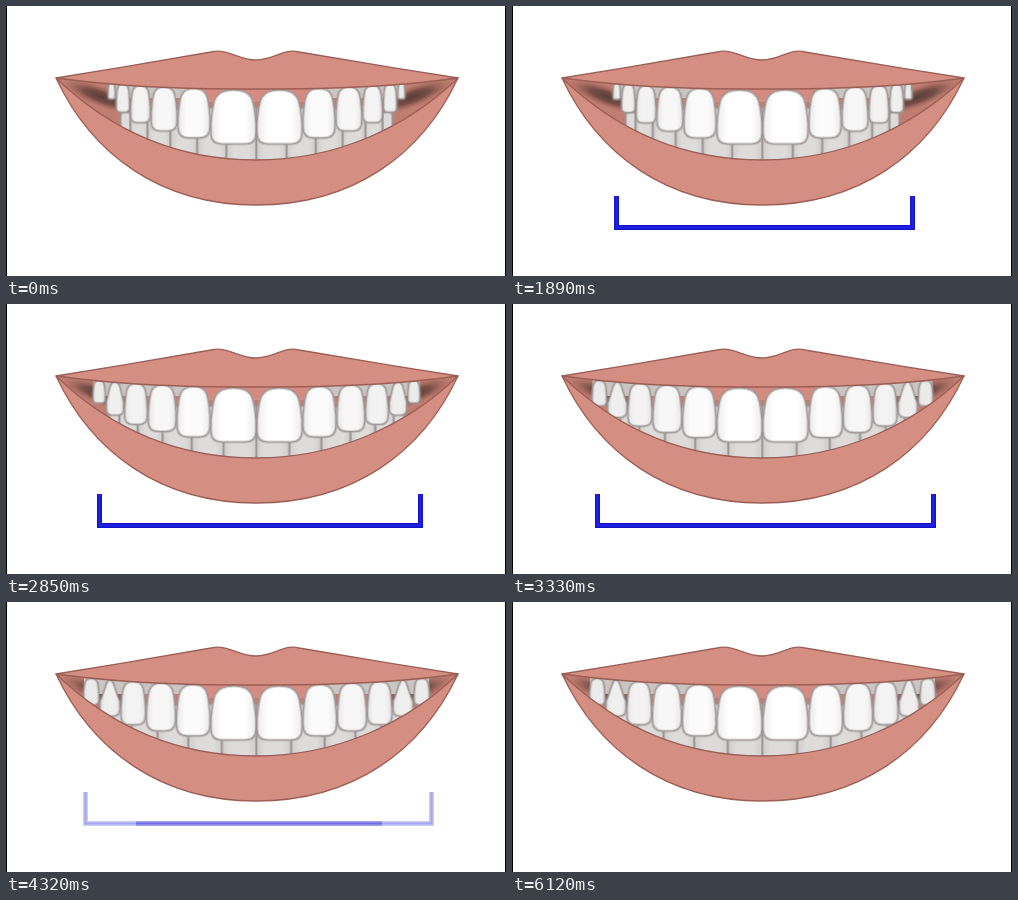
Animation of 500 by 270 pixels, one loop 6.33 s. Source, as an HTML page with a canvas:

```html
<!DOCTYPE html>
<html lang="en">
<head>
<meta charset="utf-8">
<title>Widening smile</title>
<style>
html, body { margin: 0; width: 100%; height: 100%; overflow: hidden; background: #fff; }
canvas { display: block; width: 500px; height: 270px; }
</style>
</head>
<body>
<canvas id="stage" width="500" height="270"></canvas>
<script>
const ctx = document.getElementById('stage').getContext('2d');
const LOOP = 6330, STEP = 30;
const MOVE_START = 1740, MOVE_END = 3630;
const PER_SIDE = 6, MIDDLE = 250.5;

const mouth = new Path2D('M50 72C110 80 160 83 250 83C340 83 395 80 452 72' +
  'C400 122 330 154 250 154C170 154 105 125 50 72Z');
const lips = new Path2D('M50 72C100 64 160 54 205 46C222 42 232 54 250 54' +
  'C268 54 278 42 293 46C340 54 400 64 452 72' +
  'C416 149 347 199 250 199C155 199 86 149 50 72Z');

const mix = (a, b, k) => a + (b - a) * k;
const clamp = v => Math.max(0, Math.min(1, v));
const smooth = u => u * u * (3 - 2 * u);

// Distances from the middle line to each tooth edge, given a width rule.
function edges(width) {
  const list = [0];
  for (let i = 0; i < PER_SIDE; i++) list.push(list[i] + width(i));
  return list;
}

function sideShade(x0, x1, edge, mid) {
  const g = ctx.createLinearGradient(x0, 0, x1, 0);
  g.addColorStop(0, edge);
  g.addColorStop(.25, mid);
  g.addColorStop(.75, mid);
  g.addColorStop(1, edge);
  return g;
}

// Fill, then a soft grey rim.
function paint() {
  ctx.fill();
  ctx.strokeStyle = 'rgba(160,154,154,.4)';
  ctx.lineWidth = 3;
  ctx.stroke();
  ctx.strokeStyle = 'rgba(150,143,143,.75)';
  ctx.lineWidth = 1.1;
  ctx.stroke();
}

function tooth(x0, x1, top, bottom, taper) {
  const w = x1 - x0, h = bottom - top, d = w * taper, r = Math.min(11, w * .36);
  ctx.beginPath();
  ctx.moveTo(x0 + w / 2, top);
  ctx.bezierCurveTo(x0 + d, top, x0 + d, top + h * .2, x0, top + h * .6);
  ctx.lineTo(x0, bottom - r);
  ctx.quadraticCurveTo(x0, bottom, x0 + r, bottom);
  ctx.lineTo(x1 - r, bottom);
  ctx.quadraticCurveTo(x1, bottom, x1, bottom - r);
  ctx.lineTo(x1, top + h * .6);
  ctx.bezierCurveTo(x1 - d, top + h * .2, x1 - d, top, x0 + w / 2, top);
  paint();
}

function lowerTeeth(k) {
  const xs = edges(i => mix(30, 34.5, k) - mix(.8, .95, k) * i * i);
  for (let i = PER_SIDE - 1; i >= 0; i--) {
    for (const side of [-1, 1]) {
      const x0 = MIDDLE + side * xs[i], x1 = MIDDLE + side * xs[i + 1];
      ctx.fillStyle = sideShade(x0, x1, '#cfcdcc', '#dddcdb');
      ctx.beginPath();
      ctx.roundRect(Math.min(x0, x1), 101 + i, Math.abs(x1 - x0), 60, 4);
      paint();
    }
  }
}

function upperTeeth(k) {
  const xs = edges(i => i ? mix(33, 34.5, k) - mix(6.2, 4.5, k) * (i - 1) : 46);
  const reach = xs[PER_SIDE] - 1;
  ctx.fillStyle = '#cbc5c3';
  ctx.fillRect(MIDDLE - reach, 76, reach * 2, 16);
  ctx.fillStyle = '#d58b80';
  ctx.fillRect(MIDDLE - 62, 80, 124, 16);
  for (let i = PER_SIDE - 1; i >= 0; i--) {
    const bottom = 138 - mix(6, 4, k) * i - .12 * i ** 3;
    const taper = i === 4 ? mix(.05, .3, k) : .05;
    const light = 255 - 4 * i, dim = 236 - 3 * i;
    for (const side of [-1, 1]) {
      const a = MIDDLE + side * (xs[i] + .5), b = MIDDLE + side * (xs[i + 1] - .5);
      const x0 = Math.min(a, b), x1 = Math.max(a, b);
      ctx.fillStyle = sideShade(x0, x1, `rgb(${dim},${dim},${dim})`, `rgb(${light},${light},${light})`);
      tooth(x0, x1, 84 - 1.5 * i, bottom, taper);
    }
  }
}

function corner(side) {
  ctx.save();
  ctx.translate(251 + side * 155, 91);
  ctx.rotate(-side * .36);
  ctx.scale(1, .25);
  const g = ctx.createRadialGradient(0, 0, 0, 0, 0, 42);
  g.addColorStop(0, 'rgba(82,58,52,.95)');
  g.addColorStop(.45, 'rgba(100,66,59,.8)');
  g.addColorStop(1, 'rgba(150,90,80,0)');
  ctx.fillStyle = g;
  ctx.fillRect(-42, -42, 84, 84);
  ctx.restore();
}

function face(k) {
  ctx.fillStyle = '#d48e82';
  ctx.fill(lips);
  ctx.save();
  ctx.clip(mouth);
  ctx.fillStyle = '#c07d71';
  ctx.fillRect(40, 60, 420, 100);
  corner(-1);
  corner(1);
  lowerTeeth(k);
  upperTeeth(k);
  ctx.restore();
  ctx.lineJoin = 'round';
  ctx.strokeStyle = '#9c5f55';
  ctx.lineWidth = 1.3;
  ctx.stroke(lips);
  ctx.stroke(mouth);
}

function blueLine(alpha, points) {
  ctx.globalAlpha = alpha;
  ctx.lineJoin = 'miter';
  for (const [color, width] of [['#1414c8', 5], ['#2222ee', 2]]) {
    ctx.strokeStyle = color;
    ctx.lineWidth = width;
    ctx.beginPath();
    points.forEach(p => ctx.lineTo(...p));
    ctx.stroke();
  }
  ctx.globalAlpha = 1;
}

function bracket(t, u) {
  const alpha = Math.min(clamp((t - 840) / 540), clamp((4500 - t) / 800));
  if (alpha <= 0) return;
  const x0 = Math.round(mix(105, 79, u ** 1.45)) + .5;
  const x1 = Math.round(mix(398, 425, u)) + .5;
  const y = 221.5;
  blueLine(alpha, [[x0, 190], [x0, y], [x1, y], [x1, 190]]);
  // The middle of the bar lingers while the rest fades.
  if (t > 4140 && t < 4380) {
    ctx.fillStyle = '#fff';
    ctx.fillRect(130, y - 3, 246, 6);
    blueLine(.4, [[130, y], [376, y]]);
  }
}

function draw() {
  const t = Math.floor(performance.now() % LOOP / STEP) * STEP;
  const u = clamp((t - MOVE_START) / (MOVE_END - MOVE_START));
  ctx.fillStyle = '#fff';
  ctx.fillRect(0, 0, 500, 270);
  face(mix(u, smooth(u), .6));
  bracket(t, u);
  ctx.fillStyle = '#000';
  ctx.fillRect(0, 0, 1, 270);
  ctx.fillRect(499, 0, 1, 270);
  requestAnimationFrame(draw);
}
draw();
</script>
</body>
</html>
```
